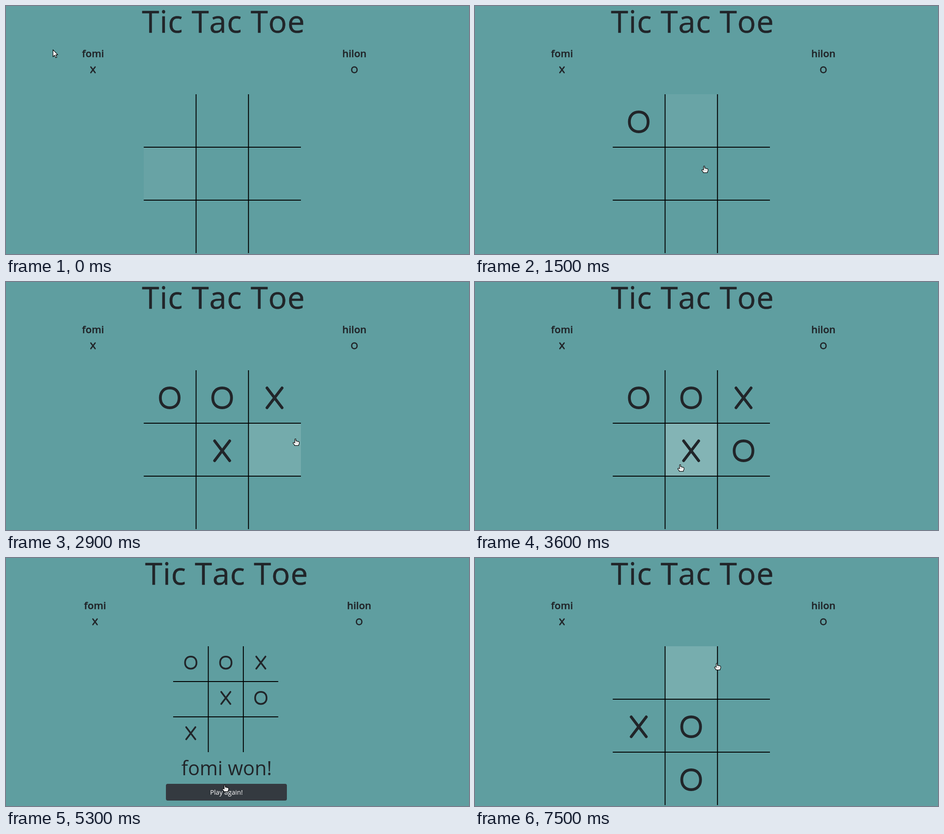
Recreate the animation shown at these times as an HTML page with a canvas. Size 1022 px wide and 548 px high, loop 8 s.

```html
<!DOCTYPE html>
<html lang="en">
<head>
<meta charset="utf-8">
<title>Tic Tac Toe</title>
<style>
  html, body { margin: 0; width: 100%; height: 100%; overflow: hidden; background: #5f9ea0; }
  canvas { display: block; width: 1022px; height: 548px; }
</style>
</head>
<body>
<canvas id="stage" width="1022" height="548"></canvas>
<script>
const ctx = document.getElementById("stage").getContext("2d");
const LOOP = 8000;
const WON = 4100, RESTART = 5500;
const INK = "#212529";
const FONT = '"Open Sans", "Noto Sans", sans-serif';
const PLAYERS = ["fomi", "hilon"];
const TOP = 195;
const FULL = { left: 303.9, w: 347, h: 351 };
const HOVER_LAG = 100;

// Pointer stops: time, x, y and whether a cell is clicked there.
const STOPS = [
  [-265, 330, 371], [-100, 103, 96], [300, 103, 96], [400, 55, 115], [500, 284, 209],
  [900, 340, 223], [1200, 344, 228, true], [1500, 500, 353], [1700, 500, 353, true],
  [1900, 513, 291], [2200, 508, 262, true], [2400, 639, 255], [2600, 639, 300, true],
  [2900, 633, 346], [3200, 622, 358, true], [3300, 508, 372], [3800, 406, 424],
  [WON, 403, 435, true], [4500, 403, 435], [5300, 477, 501], [6400, 480, 485, true],
  [6700, 360, 375, true], [7000, 500, 398, true], [7500, 528, 232]
].map(([t, x, y, click]) => ({ t, x, y, click }));

const ARROW = new Path2D("M.7 .7V16.2L4.3 12.8 6.8 18.3 9.2 17.2 6.8 11.8H11.4Z");
const HAND = new Path2D("M4.5 9.5V2Q4.5 .7 5.8 .7T7 2V5.5Q8.4 5 9.2 6 10.5 5.4 11.4 6.5 " +
  "14.3 6 14.3 8.5V11.5L13 13.5V15.3H3.8V13.8L.8 10.7Q.3 8.6 2 8.5Z");

const mix = (a, b, p) => a + (b - a) * p;
const clamp = v => Math.min(1, Math.max(0, v));

// CSS "ease", solved by bisection.
function ease(x) {
  if (x <= 0 || x >= 1) return clamp(x);
  const curve = (a, b, u) => 3 * a * u * (1 - u) ** 2 + 3 * b * u * u * (1 - u) + u ** 3;
  let lo = 0, hi = 1;
  for (let i = 0; i < 24; i++) {
    const mid = (lo + hi) / 2;
    if (curve(.25, .25, mid) < x) lo = mid; else hi = mid;
  }
  return curve(.1, 1, lo);
}

// The screen refreshes in steps that grow coarser later on.
function refreshTime(time) {
  const step = time < WON ? 100 : time < 6000 ? 200 : 500;
  const from = time < WON ? 0 : time < 6000 ? WON : 6000;
  return from + Math.floor((time - from) / step) * step;
}

function pointerAt(t) {
  const next = STOPS.findIndex(s => s.t > t);
  if (next < 0) return STOPS[STOPS.length - 1];
  if (next === 0) return STOPS[0];
  const a = STOPS[next - 1], b = STOPS[next];
  const p = (t - a.t) / (b.t - a.t);
  return { x: mix(a.x, b.x, p), y: mix(a.y, b.y, p) };
}

// Cell of the full-size board under the pointing finger, or -1.
function cellAt({ x, y }) {
  const c = Math.floor((x + 5 - FULL.left) / FULL.w * 3);
  const r = Math.floor((y - TOP) / FULL.h * 3);
  return c < 0 || c > 2 || r < 0 || r > 2 ? -1 : r * 3 + c;
}

const MOVES = STOPS.filter(s => s.click)
  .map((s, i) => ({ t: s.t, cell: cellAt(s), kind: "OX"[i % 2] }));

function hoveredCell(t) {
  if (t >= WON && t < 6000) return -1;
  const cell = cellAt(pointerAt(t - HOVER_LAG));
  const clicked = MOVES.some(m => m.cell === cell && t >= m.t && t < m.t + 400);
  return clicked ? -1 : cell;
}

// Cells brighten while hovered and fade faster afterwards.
function hoverLevels(t) {
  const levels = Array(9).fill(0), dt = 10;
  for (let s = t - 700; s < t; s += dt) {
    const hovered = hoveredCell(s);
    levels.forEach((v, i) => { levels[i] = clamp(v + (i === hovered ? dt / 300 : -dt / 170)); });
  }
  return levels;
}

function text(str, x, y, size, { weight = 400, color = INK, spacing = 0, outline = 0 } = {}) {
  ctx.font = `${weight} ${size}px ${FONT}`;
  ctx.letterSpacing = spacing + "px";
  ctx.fontKerning = "none";
  ctx.textAlign = "center";
  ctx.fillStyle = ctx.strokeStyle = color;
  ctx.fillText(str, x, y);
  if (!outline) return;
  ctx.lineWidth = outline;
  ctx.lineJoin = "round";
  ctx.strokeText(str, x, y);
}

// A round-ended cross or a squarish oval, h being its full height.
function symbol(kind, x, y, h, line) {
  const ry = (h - line) / 2;
  const rx = ry * (kind === "X" ? .76 : .945);
  ctx.lineWidth = line;
  ctx.lineCap = "round";
  ctx.strokeStyle = INK;
  ctx.beginPath();
  if (kind === "X") {
    for (const side of [-1, 1]) {
      ctx.moveTo(x - rx * side, y - ry);
      ctx.lineTo(x + rx * side, y + ry);
    }
  } else {
    const kx = rx * .61, ky = ry * .61;
    for (const side of [-1, 1]) {
      ctx.moveTo(x, y - ry);
      ctx.bezierCurveTo(x + side * kx, y - ry, x + side * rx, y - ky, x + side * rx, y);
      ctx.bezierCurveTo(x + side * rx, y + ky, x + side * kx, y + ry, x, y + ry);
    }
  }
  ctx.stroke();
}

function drawHeader(wide) {
  text("Tic Tac Toe", wide ? 487.5 : 480.5, 59, 68, { spacing: 1.2, outline: .6 });
  const centers = wide ? [196.5, 779.5] : [192, 769];
  centers.forEach((x, i) => {
    text(PLAYERS[i], x, 113, 22, { weight: 600, outline: .4 });
    symbol("XO"[i], x, 141, 15.5, 2.8);
  });
}

function drawBoard(t, wide, shrink) {
  const w = mix(FULL.w, 232, shrink), h = mix(FULL.h, 234, shrink);
  const left = FULL.left + (FULL.w - w) / 2 + (wide ? 7.8 : 0);
  const xAt = c => left + c * w / 3;
  const yAt = r => Math.round(TOP + r * h / 3);

  hoverLevels(t).forEach((level, cell) => {
    const c = cell % 3, r = Math.floor(cell / 3);
    const x = Math.round(xAt(c)), y = yAt(r);
    ctx.fillStyle = `rgba(255,255,255,${.32 * level})`;
    ctx.fillRect(x, y, Math.round(xAt(c + 1)) - x, yAt(r + 1) - y);
  });

  ctx.fillStyle = "#000";
  for (const i of [1, 2]) {
    ctx.fillRect(xAt(i) - 1, TOP, 2, yAt(3) - TOP);
    ctx.fillRect(Math.round(left), yAt(i) - 1, Math.round(w), 2);
  }

  const small = t >= WON && t < RESTART;
  for (const { t: placed, cell, kind } of MOVES) {
    if (t < placed || (t >= RESTART && placed < RESTART)) continue;
    const x = xAt(cell % 3 + .5) - (small ? 0 : .3);
    const y = yAt(Math.floor(cell / 3)) + (small ? 36.2 : 61);
    symbol(kind, x, y, small ? 30.5 : 50, small ? 3.8 : 6.2);
  }
  return TOP + h;
}

function drawResult(bottom) {
  text(PLAYERS[0] + " won!", 487, bottom + 51, 43);
  const y = Math.round(bottom + 70);
  ctx.fillStyle = "#343a40";
  ctx.beginPath();
  ctx.roundRect(353, y, 267, 37, 4);
  ctx.fill();
  text("Play again!", 486.5, y + 24, 14.5, { color: "#fff" });
}

function drawPointer(t) {
  if (t >= 100 && t < 400) return;
  const arrow = t < 600 || (t >= WON && t < 5300);
  const shape = arrow ? ARROW : HAND;
  const { x, y } = pointerAt(t);
  ctx.save();
  ctx.translate(Math.round(x), Math.round(y));
  ctx.lineWidth = 1.2;
  ctx.lineJoin = "round";
  ctx.fillStyle = "#fff";
  ctx.strokeStyle = "#000";
  ctx.fill(shape);
  ctx.stroke(shape);
  if (!arrow) {
    ctx.fillStyle = "#555";
    for (const dot of [6, 8, 10]) ctx.fillRect(dot, 9, 1, 1);
  }
  ctx.restore();
}

function draw(now) {
  const t = refreshTime(now % LOOP);
  const wide = t >= 4500 && t < 5700;
  const shrink = ease((t - 4070) / 1120) * (1 - ease((t - 5420) / 1000));

  ctx.fillStyle = "#5f9ea0";
  ctx.fillRect(0, 0, 1022, 548);
  drawHeader(wide);
  const bottom = drawBoard(t, wide, shrink);
  if (t >= WON && t < 6000) drawResult(bottom);
  drawPointer(t);
}

const start = performance.now();
function tick() {
  draw(performance.now() - start);
  requestAnimationFrame(tick);
}
tick();
</script>
</body>
</html>
```
